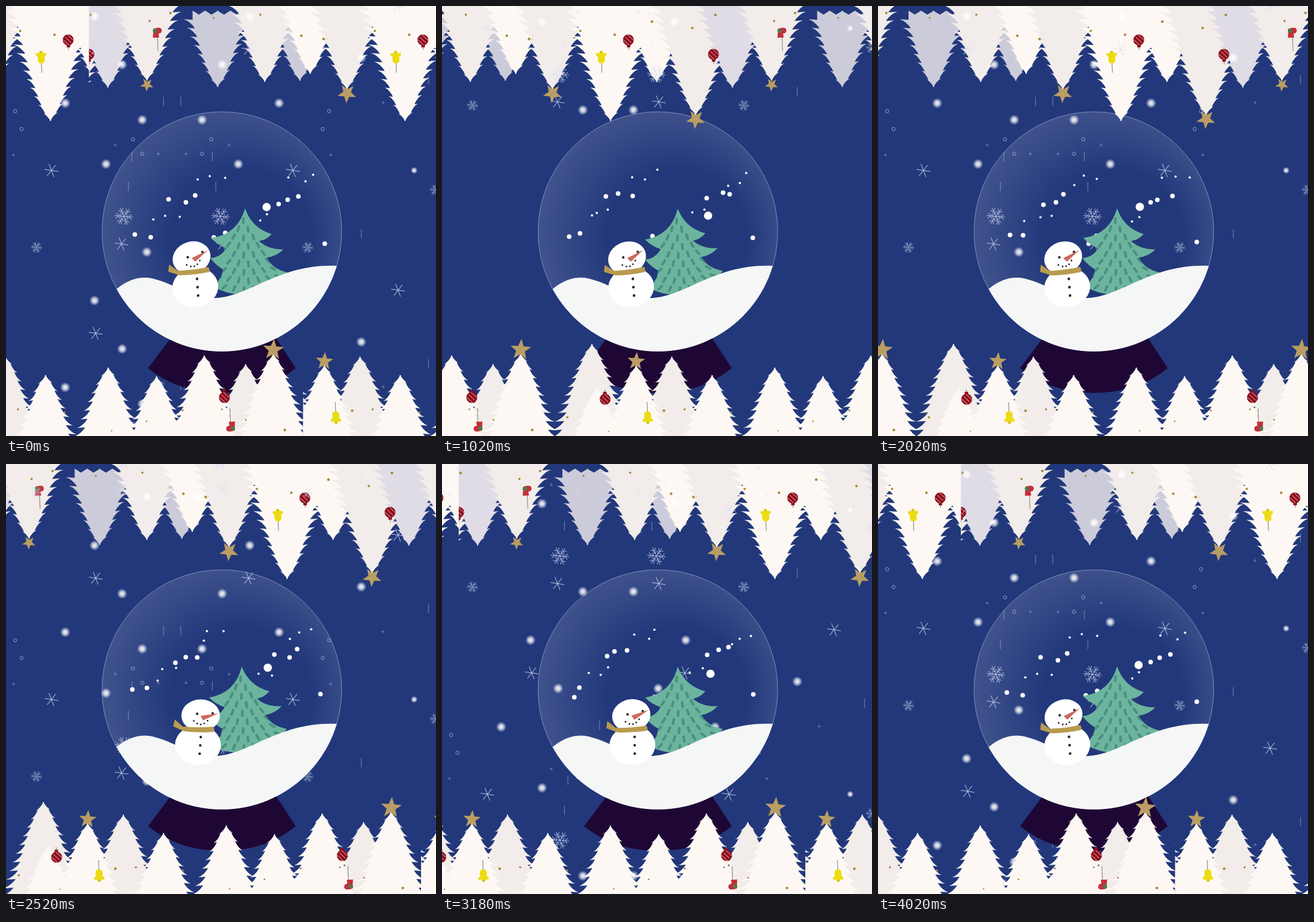
An HTML page with a canvas that plays this animation: 748x748 px, repeating every 4110 ms.

```html
<!DOCTYPE html>
<html lang="en">
<head>
<meta charset="utf-8">
<title>Snow globe</title>
<style>
html, body { margin: 0; height: 100%; overflow: hidden; background: #22387b; }
canvas { display: block; width: 100vw; height: 100vh; }
</style>
</head>
<body>
<canvas id="stage" width="748" height="748"></canvas>
<script>
const ctx = document.getElementById('stage').getContext('2d');
const LOOP = 4110, STEP = 1000 / 12, LAST = 44;
const NAVY = '#22387b', CREAM = '#fdf8f3', SHADE = '#f2ecea', GREY = '#cccbd9',
  LILAC = '#dfdce5', GOLD = '#b99d63', OCHRE = '#a98a3c', RED = '#8e0c1c', INK = '#2c2530';
const TAU = Math.PI * 2;
const clamp = v => Math.max(0, Math.min(1, v));
const frac = v => v - Math.floor(v);
const rand = n => frac(Math.sin(n * 127.1 + 11.7) * 43758.5453);

function at(x, y, angle, draw) {
  ctx.save();
  ctx.translate(x, y);
  ctx.rotate(angle);
  draw();
  ctx.restore();
}
function ellipse(x, y, rx, ry, color) {
  ctx.fillStyle = color;
  ctx.beginPath();
  ctx.ellipse(x, y, rx, ry, 0, 0, TAU);
  ctx.fill();
}
const disc = (x, y, r, color) => ellipse(x, y, r, r, color);
function shape(path, color) {
  ctx.fillStyle = color;
  ctx.fill(new Path2D(path));
}
function line(x1, y1, x2, y2) {
  ctx.beginPath();
  ctx.moveTo(x1, y1);
  ctx.lineTo(x2, y2);
  ctx.stroke();
}

// ---- forest strips: x along the strip, y measured from the stage edge ----

// x, tip, colour, star radius
const topTrees = [
  [33, 142, LILAC], [224, 141, GREY], [367, 130, GREY], [101, 130, SHADE, 12], [306, 132, SHADE],
  [385, 118, CREAM], [449, 145, SHADE, 17], [550, 200, CREAM], [630, 132, CREAM], [698, 190, SHADE, 17]
];
const bottomTrees = [
  [100, 125, SHADE], [657, 160, SHADE], [518, 138, SHADE], [172, 140, CREAM], [255, 104, CREAM],
  [339, 119, CREAM], [448, 106, CREAM], [648, 84, CREAM], [580, 123, CREAM, 16], [52, 143, CREAM, 19]
];
const topToys = [[ball, 0, 85], [ball, 581, 60], [bell, 534, 90], [sock, 119, 47]];
const bottomToys = [[ball, 137, 68], [ball, 634, 65], [bell, 560, 33], [sock, 126, 17]];

function fir(x, tip, color, star) {
  const base = color === GREY ? 8 : -25;
  ctx.fillStyle = color;
  for (const side of [-1, 1]) {
    let w0 = 0, d0 = 0;
    ctx.beginPath();
    ctx.moveTo(x - side, tip);
    ctx.lineTo(x, tip);
    for (let d = 14 + side; d < tip - base; d += 15) {
      const w = 1.9 * d ** .72;
      ctx.quadraticCurveTo(x + side * (w0 + (w - w0) * .4), tip - d + 4, x + side * w, tip - d);
      w0 = w * .74;
      d0 = d - 1;
      ctx.lineTo(x + side * w0, tip - d0);
    }
    // jagged foot
    for (let i = 4; i >= 0; i--) ctx.lineTo(x + side * (w0 * i / 4 - (i ? 0 : 1)), base + i % 2 * 7);
    ctx.fill();
  }
  if (star) at(x, tip + 7, .08, () => {
    ctx.fillStyle = GOLD;
    ctx.beginPath();
    for (let i = 0; i < 10; i++) {
      const r = i % 2 ? star * .42 : star, a = i * TAU / 10 + TAU / 4;
      ctx.lineTo(r * Math.cos(a), r * Math.sin(a));
    }
    ctx.fill();
  });
}
function cord(from, to) {
  ctx.strokeStyle = '#8d8780';
  ctx.lineWidth = 1.2;
  line(0, from, 0, to);
}
function ball() {
  cord(9, 16);
  ctx.fillStyle = RED;
  ctx.fillRect(-3, 7, 6, 5);
  disc(0, -1, 9.5, RED);
  ctx.strokeStyle = '#d99a9c';
  ctx.lineWidth = 1.1;
  for (let i = -1; i < 2; i++) line(i * 4 - 5, -i * 4 - 6, i * 4 + 5, 4 - i * 4);
}
function bell() {
  cord(9, 26);
  disc(0, -9, 3, '#d8c90f');
  shape('M-9-8L9-8Q10-4 6-2V5Q5 10 0 10Q-5 10-6 5V-2Q-10-4-9-8Z', '#ecdc14');
}
function sock() {
  cord(8, 31);
  shape('M-8 8L3 8L2 1Q8 1 8-5Q7-10 0-9L-6-8Q-8-6-7-2Z', '#c2303a');
  disc(-4, -4, 3.6, '#4e7a4c');
}
function strip(trees, toys, seed) {
  trees.forEach(t => fir(...t));
  for (let i = 0; i < 11; i++)
    disc(i * 66 + 40 * rand(i + seed), 8 + 50 * rand(i + seed + 40), 1 + 1.7 * rand(i + seed + 80), OCHRE);
  for (const [toy, x, y] of toys) at(x, y, -.04, toy);
}
// The pattern repeats every 729, but its two runs meet at a visible seam.
function forest(x, y, turn, ...args) {
  at(x, y, turn, () => {
    for (const [shift, left] of [[0, 0], [-617, -1400]]) {
      ctx.save();
      ctx.beginPath();
      ctx.rect(left, -300, 1400, 600);
      ctx.clip();
      for (let n = -1; n < 2; n++) at(shift + n * 729, 0, 0, () => strip(...args));
      ctx.restore();
    }
  });
}

// ---- falling snow: every piece is mirrored about AXIS and returns each WAVE steps ----

const AXIS = 289, WAVE = 24, FALL = 20.6;
// distance from the axis, height at step 20
const snow = [
  [glow, [186, 169], [87, 102], [52, 198], [115, 275], [44, 428], [135, 18], [329, 90]],
  [spark, [421, 286]],
  [aster, [210, 286], [88, 414], [133, 75], [393, 0]],
  [flake, [84, 366]],
  [smallFlake, [236, 420], [458, 320]],
  [ring, [273, 183], [262, 214], [68, 232], [52, 257]],
  [plus, [276, 259], [99, 242], [24, 257], [367, 168]],
  [streak, [15, 166], [70, 262], [76, 314], [329, 396], [446, 128]]
];
function pen(alpha, width = 1.2) {
  ctx.strokeStyle = `rgba(215,222,245,${alpha})`;
  ctx.lineWidth = width;
}
function glow(r = 9) {
  const g = ctx.createRadialGradient(0, 0, 0, 0, 0, r);
  g.addColorStop(0, 'rgba(255,255,255,.95)');
  g.addColorStop(.4, 'rgba(255,255,255,.75)');
  g.addColorStop(1, 'rgba(255,255,255,0)');
  disc(0, 0, r, g);
}
function spark() { glow(6); }
function aster() {
  pen(.7);
  for (let i = 0; i < 3; i++) at(0, 0, .15 + i * TAU / 6, () => line(-12, 0, 12, 0));
}
function flake(r = 16) {
  pen(.55, r / 11);
  for (let i = 0; i < 6; i++) at(0, 0, .1 + i * TAU / 6, () => {
    line(0, 0, r, 0);
    for (const s of [-1, 1]) {
      line(r * .55, 0, r * .85, s * r * .3);
      line(r * .3, 0, r * .5, s * r * .22);
    }
  });
}
function smallFlake() { flake(10); }
function ring() {
  pen(.5);
  ctx.beginPath();
  ctx.arc(0, 0, 2.8, 0, TAU);
  ctx.stroke();
}
function plus() {
  pen(.4, 1);
  line(-3, 0, 3, 0);
  line(0, -3, 0, 3);
}
function streak() {
  pen(.5, 1);
  line(0, -8, 0, 8);
}
function snowfall(k) {
  for (const [draw, ...spots] of snow)
    for (const [dx, y] of spots)
      for (const side of [-1, 1])
        for (let age = k; age > 0; age -= WAVE)
          at(AXIS + side * dx, y + FALL * (age - 20), 0, () => draw());
}

// ---- globe ----

const globeOutline = () => {
  ctx.beginPath();
  ctx.arc(375.5, 392.5, 208.5, 0, TAU);
};
function inGlobe(scale, draw) {
  at(376, 668, 0, () => {
    ctx.scale(scale, scale);
    ctx.translate(-376, -668);
    draw();
  });
}
function glass() {
  globeOutline();
  ctx.fillStyle = NAVY;
  ctx.fill();
  const g = ctx.createRadialGradient(410, 405, 120, 385, 395, 225);
  g.addColorStop(0, 'rgba(255,255,255,0)');
  g.addColorStop(1, 'rgba(255,255,255,.14)');
  ctx.fillStyle = g;
  ctx.fill();
  ctx.strokeStyle = '#8490b8';
  ctx.lineWidth = 1;
  ctx.stroke();
}
// Foot of the globe, with its upper edge following the glass.
function foot() {
  shape('M285 580L247 630Q300 673 376 673Q452 673 504 630L470 578A208.5 208.5 0 0 1 285 580Z', '#1e0735');
}
const pine = new Path2D('M417 352Q429 387 463 397Q454 407 441 409Q456 424 483 424Q471 436 454 438' +
  'Q464 458 490 464Q460 505 405 502Q375 498 360 486Q375 477 378 458Q366 451 356 438Q374 437 384 421' +
  'Q368 415 358 403Q404 397 417 352Z');
function pineTree(k) {
  const lean = (Math.cos((k - 5) * TAU / 8) - 1) * .028;
  at(422, 498, lean, () => {
    ctx.translate(-422, -498);
    ctx.fillStyle = '#6cb49e';
    ctx.fill(pine);
    ctx.clip(pine);
    ctx.strokeStyle = '#4a9181';
    ctx.lineWidth = 4.5;
    ctx.lineCap = 'round';
    for (let row = 0; row < 9; row++)
      for (let i = -4; i <= 4; i++) {
        const dx = i * 17 + row % 2 * 8 - 4;
        if (Math.abs(dx) < 10 + row * 7)
          at(418 + dx, 374 + row * 15 - Math.abs(dx) * .15, -dx * .022, () => line(0, -4, 0, 4));
      }
  });
}
function snowman(k) {
  const amp = clamp((k - 4) / 4);
  const pose = .5 - .5 * amp * Math.cos((k - 19.5) * TAU / 11.8);
  at(333, 525, (pose - 1) * .14, () => {
    ctx.translate(-333, -525);
    ellipse(334, 489, 40, 34.5, '#fff');
    for (let i = 0; i < 3; i++) disc(339 - i, 475 + i * 14.5, 2.3, INK);
    at(336, 462, (pose - 1) * .2, () => {
      ctx.translate(-336, -462);
      ellipse(339, 437.5, 33.5, 28, '#fff');
      disc(333, 434.5, 2.2, INK);
      disc(360, 434, 2.2, INK);
      shape('M339 438L370 434L343 446Z', '#cc6a5c');
      for (let i = -2; i <= 2; i++) disc(339 + i * 6, 453 - i * i * 1.6, 1.5, INK);
    });
    shape('M312 457Q337 459 361 457Q364 462 361 466Q336 468 310 465L291 456L294 444L308 457Z', '#b99b4f');
  });
}
function flurry(k) {
  for (let i = 0; i < 26; i++) {
    const a = k * (.2 + .12 * rand(i)) + TAU * rand(i + 50);
    const x = i ? 215 + 340 * frac(i * .618) : 460;
    const y = i ? 290 + 135 * frac(i * .755) : 357;
    disc(x + 7 * Math.sin(a), y + 8 * Math.cos(a * .9), i ? 2 + i % 2 * 2 : 7.2, '#fff');
  }
}
function scene(k) {
  foot();
  ctx.save();
  globeOutline();
  ctx.clip();
  flurry(k);
  pineTree(k);
  shape('M160 515L193 492C215 474 235 470 255 474C300 485 320 510 365 508' +
    'C425 505 475 448 575 452L600 452V620H160Z', '#f5f6f6');
  ctx.restore();
  snowman(k);
}

// ---- timeline ----

function popIn(k) {
  const p = clamp(k / 6.9) - 1;
  return Math.max(0, 1 + 2.70158 * p ** 3 + 1.70158 * p ** 2);
}
function paint(k) {
  ctx.fillStyle = NAVY;
  ctx.fillRect(0, 0, 748, 748);
  if (k < 0) return;
  const j = k - 4, scroll = 10.5 * j + .0145 * j * j;
  const off = 200 * (1 - clamp((k + .6) / 6.2)) ** 3;
  const size = popIn(k);
  inGlobe(size, glass);
  forest(scroll - 299, -off, 0, topTrees, topToys, 3);
  snowfall(k);
  inGlobe(size, () => scene(k));
  forest(960 - scroll, 748 + off, Math.PI, bottomTrees, bottomToys, 200);
}
function stepAt(t) {
  if (t < 100) return LAST;
  if (t < 350) return -1;
  return Math.min(LAST, Math.floor((t - 346) / STEP));
}

const start = performance.now();
let shown;
function tick() {
  const k = stepAt((performance.now() - start) % LOOP);
  if (k !== shown) paint(shown = k);
  requestAnimationFrame(tick);
}
tick();
</script>
</body>
</html>
```
